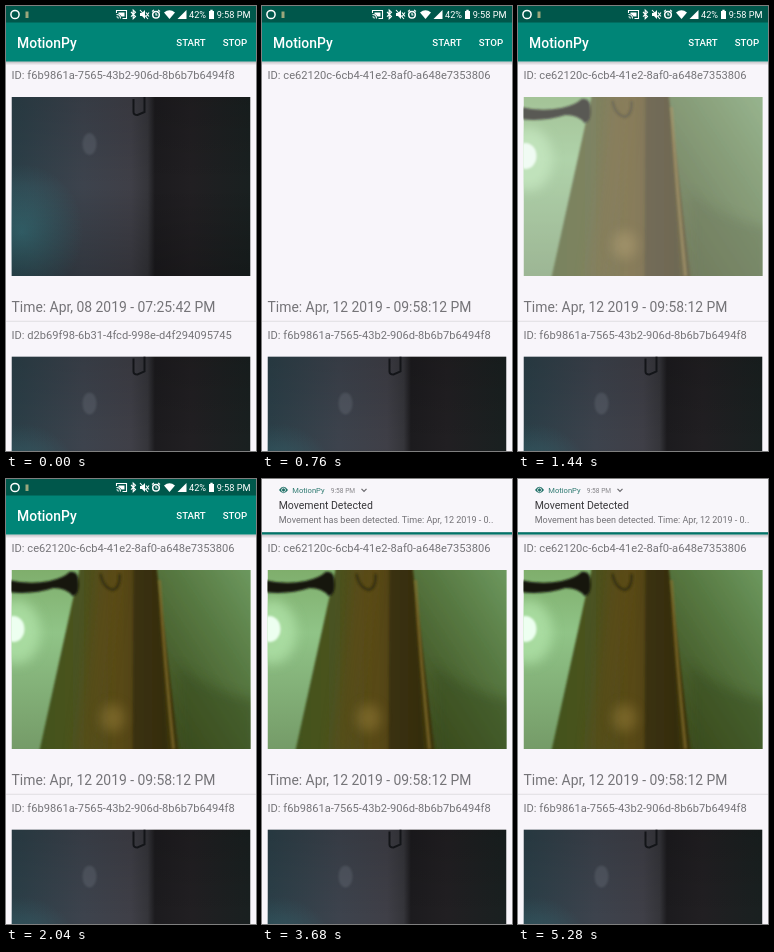
These frames come from a looping animation (250x445 px, 5320 ms). An HTML page:

```html
<!DOCTYPE html>
<html lang="en">
<head>
<meta charset="utf-8">
<title>Motion list</title>
<style>
  html, body { margin: 0; width: 100%; height: 100%; overflow: hidden; background: #f8f5fa; }
  svg { display: block; width: 100vw; height: 100vh; font-family: Roboto, sans-serif; }
  .muted { fill: #757478; }
  .medium { font-weight: 500; }
</style>
</head>
<body>
<svg viewBox="0 0 250 445">
  <defs>
    <clipPath id="frame"><rect width="239" height="179"/></clipPath>
    <filter id="soft" x="-50%" y="-50%" width="200%" height="200%"><feGaussianBlur stdDeviation="1.2"/></filter>
    <filter id="softer" x="-80%" y="-80%" width="260%" height="260%"><feGaussianBlur stdDeviation="6"/></filter>
    <linearGradient id="night">
      <stop offset="0" stop-color="#2b3f48"/>
      <stop offset=".3" stop-color="#3d434d"/>
      <stop offset=".5" stop-color="#3f3f47"/>
      <stop offset=".57" stop-color="#35353a"/>
      <stop offset=".6" stop-color="#1c1b1e"/>
      <stop offset=".75" stop-color="#211f22"/>
      <stop offset="1" stop-color="#192020"/>
    </linearGradient>
    <linearGradient id="dusk" x2="0" y2="1">
      <stop offset="0" stop-color="#000" stop-opacity=".12"/>
      <stop offset=".5" stop-color="#000" stop-opacity="0"/>
      <stop offset="1" stop-color="#000" stop-opacity=".2"/>
    </linearGradient>
    <radialGradient id="teal">
      <stop offset="0" stop-color="#38727b" stop-opacity=".75"/>
      <stop offset="1" stop-color="#38727b" stop-opacity="0"/>
    </radialGradient>
    <linearGradient id="wall" x2="0" y2="1">
      <stop offset="0" stop-color="#7fae6c"/>
      <stop offset=".35" stop-color="#90c487"/>
      <stop offset="1" stop-color="#759b68"/>
    </linearGradient>
    <linearGradient id="door">
      <stop offset="0" stop-color="#42521f"/>
      <stop offset=".3" stop-color="#4b5220"/>
      <stop offset=".55" stop-color="#5a4a17"/>
      <stop offset=".75" stop-color="#4a3d12"/>
      <stop offset="1" stop-color="#3a3310"/>
    </linearGradient>
    <linearGradient id="side" x1="1" y1="0" x2=".2" y2="1">
      <stop offset="0" stop-color="#6f9c62"/>
      <stop offset=".4" stop-color="#587a43"/>
      <stop offset="1" stop-color="#3c4a1c"/>
    </linearGradient>
    <linearGradient id="shade" x2="0" y2="1">
      <stop offset="0" stop-opacity=".22"/>
      <stop offset="1" stop-opacity="0"/>
    </linearGradient>

    <g id="darkPhoto" clip-path="url(#frame)">
      <rect width="239" height="179" fill="url(#night)"/>
      <ellipse cx="10" cy="135" rx="62" ry="68" fill="url(#teal)"/>
      <ellipse cx="78" cy="47" rx="7" ry="11" fill="#717883" opacity=".35" filter="url(#soft)"/>
      <path d="M137 0V179" stroke="#5c5a60" stroke-width="3" opacity=".25" filter="url(#soft)"/>
      <path d="M122 2v13q0 3 4 3l7-3V0" fill="none" stroke="#15171b" stroke-width="2"/>
      <rect width="239" height="179" fill="url(#dusk)"/>
    </g>

    <g id="brightPhoto" clip-path="url(#frame)">
      <rect width="239" height="179" fill="url(#wall)"/>
      <ellipse cx="5" cy="62" rx="24" ry="32" fill="#b4e6ac" opacity=".7" filter="url(#softer)"/>
      <path d="M69 -5H150L172 185H27Z" fill="url(#door)" filter="url(#soft)"/>
      <path d="M88 -5H110L86 185H62Z" fill="#5d4c18" opacity=".5" filter="url(#softer)"/>
      <path d="M122 -5H145L157 185H121Z" fill="#2c270b" opacity=".55" filter="url(#soft)"/>
      <path d="M145 -5H245V185H168Q155 80 145 -5Z" fill="url(#side)" filter="url(#soft)"/>
      <path d="M165 95Q205 125 245 130V190H170Z" fill="#35491c" opacity=".45" filter="url(#softer)"/>
      <path d="M148 10Q153 90 162 179" fill="none" stroke="#86702f" stroke-width="3" opacity=".7" filter="url(#soft)"/>
      <ellipse cx="101" cy="148" rx="12" ry="14" fill="#937a37" opacity=".55" filter="url(#softer)"/>
      <ellipse cx="2" cy="59" rx="11" ry="13" fill="#edfff0" filter="url(#soft)"/>
      <path d="M-3 10Q18 15 38 11Q52 8 58 2Q67 0 67 12Q68 26 61 26Q55 18 42 18Q20 25 -3 22Z" fill="#17180b" filter="url(#soft)"/>
      <path d="M89 4Q91 17 101 20Q109 18 108 4" fill="none" stroke="#2f2c10" stroke-width="2.500" opacity=".8" filter="url(#soft)"/>
    </g>
  </defs>

  <rect width="250" height="445" fill="#f8f5fa"/>
  <g id="list"></g>

  <rect y="55.4" width="250" height="4" fill="url(#shade)"/>
  <rect y="16" width="250" height="39.5" fill="#008577"/>
  <rect width="250" height="16.5" fill="#00574b"/>
  <g fill="#fff" class="medium">
    <text x="11.1" y="41.7" font-size="13.9">MotionPy</text>
    <text x="170.3" y="40.2" font-size="9.7">START</text>
    <text x="216.7" y="40.2" font-size="9.7">STOP</text>
  </g>

  <g id="status" fill="none" stroke="#fff" stroke-width="1.1">
    <circle cx="9" cy="8.5" r="4.1" stroke-width="1.5"/>
    <path d="M19.5 5.5h3v6.5h-3z" fill="#9ba77c" stroke="none"/>
    <path d="M110.5 7V4.5h10v8h-4M110.5 8.5q4 0 4 4M110.5 10.7q1.8 0 1.8 1.8"/>
    <path d="M112.5 6.5h6v4h-3q-1-2-3-2.5z" fill="#fff" stroke="none"/>
    <path d="M125 6l4.5 4.5-2.3 2.2V4l2.3 2.2L125 10.7"/>
    <path d="M134 7h2l3-3v9l-3-3h-2z" fill="#fff" stroke="none"/>
    <path d="M140 6.5l3 4m0-4l-3 4M134 4l8 9"/>
    <circle cx="150" cy="8.8" r="3.3" stroke-width="1.5"/>
    <path d="M150 7v2h1.5M146 5.5l2-1.7M154 5.5l-2-1.7"/>
    <path d="M158 6.5Q163.5 2 169 6.5L163.5 13Z" fill="#fff" stroke="none"/>
    <path d="M180.5 4V13H171.5Z" fill="#fff" stroke="none"/>
    <path d="M203 5h1.3V3.8h2.4V5H208v8h-5z" fill="#fff" stroke="none"/>
  </g>
  <g fill="#fff" font-size="9.2">
    <text x="183" y="12">42%</text>
    <text x="210.7" y="12">9:58 PM</text>
  </g>

  <g id="notice">
    <rect y="53" width="250" height="3.3" fill="url(#shade)"/>
    <rect width="250" height="53.2" fill="#f8f6fa"/>
    <path d="M17 11Q21.5 4.6 26 11Q21.5 17.4 17 11Z" fill="#1d6f66"/>
    <circle cx="21.5" cy="11" r="2" fill="none" stroke="#f8f6fa" stroke-width=".8"/>
    <text x="30.3" y="13.7" font-size="7.6" fill="#2f7a71">MotionPy</text>
    <text x="68.8" y="13.6" font-size="6.6" fill="#858488">9:58 PM</text>
    <path d="M99.500 9.800l2.500 2.500 2.500-2.500" fill="none" stroke="#6a696d" stroke-width="1.200"/>
    <text x="16.7" y="30.3" font-size="10.5" fill="#38373a">Movement Detected</text>
    <text x="16.7" y="44.200" font-size="9.030" fill="#737276">Movement has been detected. Time: Apr, 12 2019 - 0..</text>
  </g>
</svg>
<script>
  const LOOP = 5320, PITCH = 259.4;
  const byId = id => document.getElementById(id);
  const cards = [
    ["ce62120c-6cb4-41e2-8af0-a648e7353806", "Apr, 12 2019 - 09:58:12 PM", "brightPhoto"],
    ["f6b9861a-7565-43b2-906d-8b6b7b6494f8", "Apr, 08 2019 - 07:25:42 PM", "darkPhoto"],
    ["d2b69f98-6b31-4fcd-998e-d4f294095745", "Apr, 08 2019 - 07:25:42 PM", "darkPhoto"]
  ];

  byId("list").innerHTML = cards.map(([id, time, photo], i) => `
    <g transform="translate(0 ${i * PITCH})">
      <text class="muted" x="5.55" y="73.2" font-size="11.14">ID: ${id}</text>
      <g class="photo"><use href="#${photo}" x="5.5" y="91"/></g>
      <text class="muted" x="5.55" y="305.5" font-size="13.9">Time: ${time}</text>
      <rect y="314.8" width="250" height=".8" fill="#d9d7db"/>
    </g>`).join("");

  const list = byId("list"), notice = byId("notice");
  const newPhoto = list.querySelector(".photo");
  const progress = (t, start, end) => Math.min(1, Math.max(0, (t - start) / (end - start)));
  const easeInOut = p => (1 - Math.cos(Math.PI * p)) / 2;
  const easeOut = p => 1 - (1 - p) ** 3;
  const moveY = (node, y) => node.setAttribute("transform", `translate(0 ${y})`);

  function draw(t) {
    moveY(list, -PITCH * (1 - easeInOut(progress(t, 160, 560))));

    // The photo fades in while its colour catches up.
    const fade = progress(t, 1260, 1520);
    newPhoto.style.opacity = fade;
    newPhoto.style.filter = fade < 1 ? `saturate(${Math.min(1, fade * 1.4)})` : "none";

    const slide = easeOut(progress(t, 2080, 2400));
    moveY(notice, -58 * (1 - slide));
    notice.style.visibility = slide > 0 ? "visible" : "hidden";
  }

  const start = performance.now();
  function tick() {
    draw((performance.now() - start) % LOOP);
    requestAnimationFrame(tick);
  }
  tick();
</script>
</body>
</html>
```
